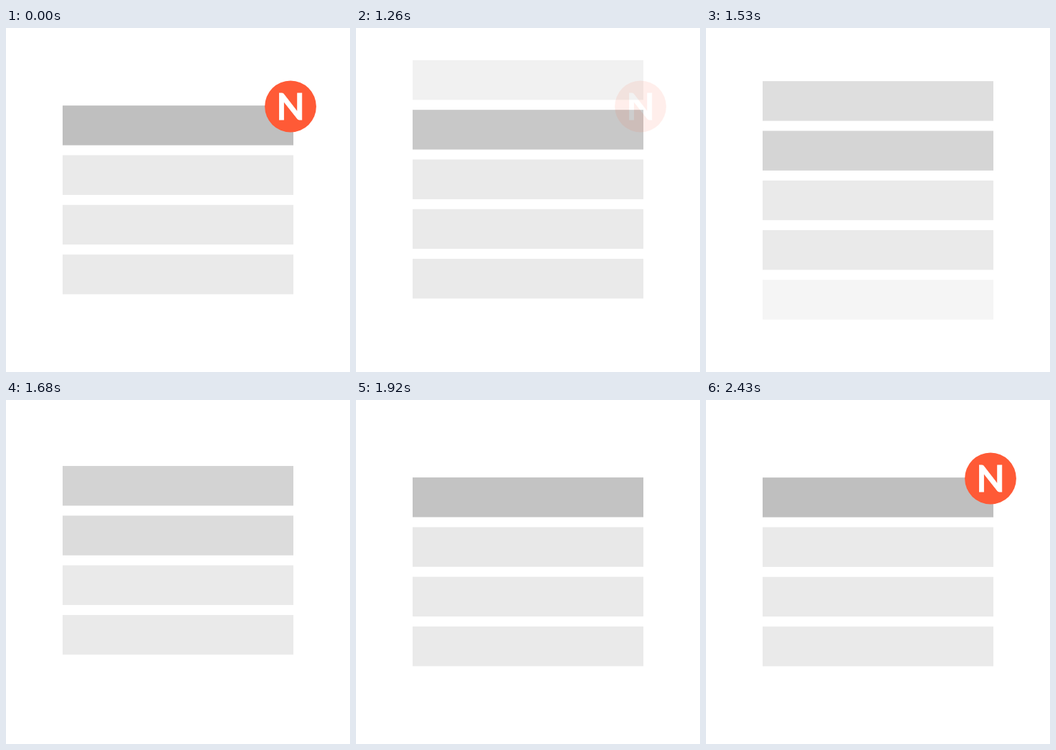
Recreate the animation shown at these times as an HTML page. Size 480 by 480 pixels, loop 2.91 s.

```html
<!DOCTYPE html>
<html lang="en">
<head>
<meta charset="utf-8">
<title>New item in a list</title>
<style>
  html, body { margin: 0; width: 100%; height: 100%; overflow: hidden; background: #fff; }
  svg { display: block; width: 100vw; height: 100vh; }
  text { font: 700 51.5px Lato, "Open Sans", sans-serif; text-anchor: middle; fill: #fff; stroke: #fff; stroke-width: .8; }
</style>
</head>
<body>
<svg viewBox="0 0 480 480">
  <g id="bars"></g>
  <g id="badge">
    <circle cx="397" cy="109.5" r="35.9" fill="#ff5a36"/>
    <text x="397" y="128">N</text>
  </g>
</svg>
<script>
  const LOOP = 2910, STEP = 30;
  const TOP = 108.2, PITCH = 69.3, BAR_H = 55.4;
  const DARK = 191, LIGHT = 234, WHITE = 255;

  const progress = (t, from, to) => Math.min(1, Math.max(0, (t - from) / (to - from)));
  const smooth = p => p * p * (3 - 2 * p);
  const mix = (a, b, p) => a + (b - a) * p;
  const gray = v => `rgb(${[v, v, v].map(Math.round)})`;

  const badge = document.getElementById("badge");
  const holder = document.getElementById("bars");

  // The first bar waits one slot above the list.
  const bars = Array.from({ length: 5 }, () => {
    const bar = document.createElementNS("http://www.w3.org/2000/svg", "rect");
    bar.setAttribute("x", 79);
    bar.setAttribute("width", 322);
    bar.setAttribute("height", BAR_H);
    return holder.appendChild(bar);
  });

  function drawBars(t) {
    const shift = PITCH * smooth(progress(t, 1110, 1940));
    const tint = progress(t, 1060, 1970);
    const leave = progress(t, 1375, 1680);
    const shades = [mix(WHITE, DARK, tint), mix(DARK, LIGHT, tint), LIGHT, LIGHT, mix(LIGHT, WHITE, leave)];
    bars.forEach((bar, i) => {
      bar.setAttribute("y", TOP + PITCH * (i - 1) + shift);
      bar.setAttribute("fill", gray(shades[i]));
    });
    bars[0].style.visibility = tint > 0 ? "visible" : "hidden";
    bars[4].style.visibility = leave < 1 ? "visible" : "hidden";
  }

  function drawBadge(t) {
    let y = 0, alpha = 1 - progress(t, 970, 1290);
    if (t >= 1935) {
      // Drops in, passes its resting place, then settles back.
      alpha = progress(t, 1935, 2090);
      y = t < 2190
        ? mix(-22, 10, smooth(progress(t, 1935, 2190)))
        : mix(10, 0, smooth(progress(t, 2190, 2430)));
    }
    badge.setAttribute("opacity", alpha);
    badge.setAttribute("transform", `translate(0 ${y})`);
  }

  const start = performance.now();
  function draw() {
    const t = Math.floor(((performance.now() - start) % LOOP) / STEP) * STEP;
    drawBars(t);
    drawBadge(t);
    requestAnimationFrame(draw);
  }
  draw();
</script>
</body>
</html>
```
